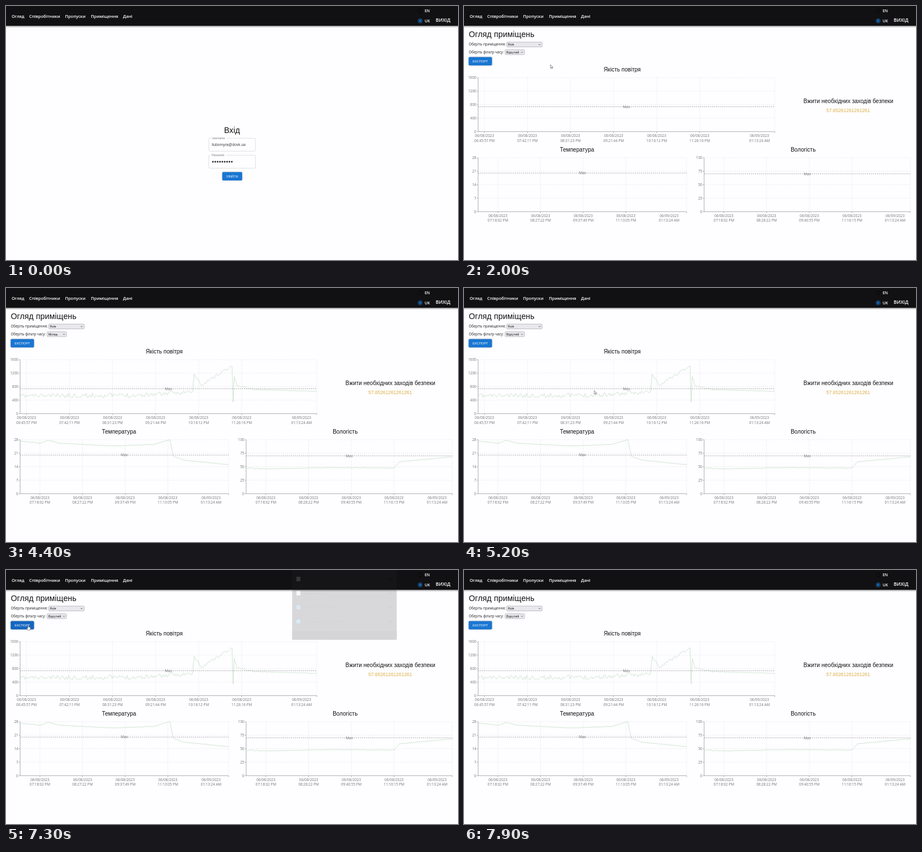
Recreate the animation shown at these times as an HTML page. Size 800 by 450 pixels, loop 8 s.

```html
<!DOCTYPE html>
<html lang="uk">
<head>
<meta charset="utf-8">
<title>Огляд приміщень</title>
<style>
html, body { margin: 0; width: 100%; height: 100%; overflow: hidden; background: #fefdff; }
svg { display: block; width: 100vw; height: 100vh; }
text { font-family: "Liberation Sans", Arial, sans-serif; fill: #111; }
.ui, .ui text, .tick { font-family: "Open Sans", "Noto Sans", sans-serif; }
.nav text { fill: #fff; font-weight: 600; font-size: 7.45px; }
.nav .lang { font-size: 6.8px; }
.nav .exit { font-size: 8.4px; }
.h4 { font-size: 14.17px; letter-spacing: .1px; }
.h5 { font-size: 10px; text-anchor: middle; }
.score { font-size: 8.33px; letter-spacing: .06px; fill: #dbb040; text-anchor: middle; }
.lab { font-size: 6.2px; fill: #222; }
.opt { font-size: 5.25px; }
.btn text { font-size: 5.6px; letter-spacing: .15px; fill: #fff; text-anchor: middle; }
.btn rect { fill: #1976d2; filter: drop-shadow(0 .8px .8px rgba(0,0,0,.35)); }
.tick { font-size: 6.35px; fill: #757575; }
.mid { text-anchor: middle; }
.end { text-anchor: end; }
.grid { stroke: #dcdcdf; stroke-width: .55; stroke-dasharray: 2 1.6; fill: none; }
.axis { stroke: #777; stroke-width: .55; fill: none; }
.max { stroke: #858083; stroke-width: .7; stroke-dasharray: 2 1.6; }
.line { fill: none; stroke: #bcdcc0; stroke-width: .7; stroke-linejoin: round; stroke-dasharray: 1 2; }
.field rect { fill: none; stroke: #c9c9cc; stroke-width: .6; }
.field .gap { fill: #fefdff; stroke: none; }
.small { font-size: 5px; fill: #777; }
.mail { font-size: 6.67px; letter-spacing: .06px; fill: #444; }
.select rect { fill: #e9e9ed; stroke: #8f8f9a; stroke-width: .55; }
.select path { fill: none; stroke: #222; stroke-width: .7; }
.popup text { font-size: 4.4px; fill: #111; }

/* hard switches */
.login { animation: hide 8s step-end infinite; }
.overview { animation: overview 8s step-end infinite; }
.empty { animation: empty 8s step-end infinite; }
.data { animation: data 8s step-end infinite; }
.before { animation: before 8s step-end infinite; }
.after { animation: after 8s step-end infinite; }
.month { animation: month 8s step-end infinite; }
.nofilter { animation: nofilter 8s step-end infinite; }
.arrow { animation: arrow 8s step-end infinite; }
.hand { animation: hand 8s step-end infinite; }
@keyframes hide { 5%, 100% { opacity: 0 } }
@keyframes overview { 0% { opacity: 0 } 5% { opacity: 1 } }
@keyframes empty { 23.75%, 100% { opacity: 0 } }
@keyframes data { 0% { opacity: 0 } 23.75% { opacity: 1 } }
@keyframes before { 20%, 100% { opacity: 0 } }
@keyframes after { 0% { opacity: 0 } 20% { opacity: 1 } }
@keyframes month { 0%, 60%, 100% { opacity: 0 } 35.6% { opacity: 1 } }
@keyframes nofilter { 35.6% { opacity: 0 } 60% { opacity: 1 } }
@keyframes arrow {
  0%, 16.2%, 32.5%, 54.9%, 87.4%, 98.6%, 100% { opacity: 0 }
  5%, 21.25%, 36.25%, 60%, 92.4% { opacity: 1 }
}
@keyframes hand { 0%, 92.4%, 100% { opacity: 0 } 87.4% { opacity: 1 } }

/* motion */
.pointer { animation: move 8s ease-in-out infinite; }
@keyframes move {
  0%, 5% { transform: translate(398px, 301px) }
  15%, 21.25% { transform: translate(105px, 72px) }
  25%, 26.25% { transform: translate(153px, 104px) }
  31.25%, 36.25% { transform: translate(95px, 83px) }
  45% { transform: translate(150px, 112px) }
  53.5%, 60% { transform: translate(95px, 83px) }
  68.75%, 81.25% { transform: translate(312px, 241px) }
  87.5%, 92% { transform: translate(38px, 97px) }
  97.5%, 100% { transform: translate(600px, 40px) }
}
/* the second drawing restarts when the filter changes */
.line { animation: draw 8s linear infinite; }
@keyframes draw {
  0% { stroke-dashoffset: 1.01 }
  25% { stroke-dashoffset: 1.01; animation-timing-function: cubic-bezier(.25,.3,.45,.95) }
  36.24% { stroke-dashoffset: .115 }
  36.25% { stroke-dashoffset: 1.01; animation-timing-function: ease }
  55%, 100% { stroke-dashoffset: 0 }
}
.btn .enter { animation: press 8s step-end infinite; }
@keyframes press { 1.25%, 100% { fill: #1565c0 } }
.btn .export { animation: hover 8s linear infinite; }
@keyframes hover { 0%, 87%, 94%, 100% { fill: #1976d2 } 88.5%, 92% { fill: #1565c0 } }
.popup { animation: popup 8s linear infinite; }
@keyframes popup { 0%, 90.6%, 97.8%, 100% { opacity: 0 } 91.25% { opacity: .17 } 92.5%, 95.5% { opacity: .92 } }
</style>
</head>
<body>
<svg viewBox="0 0 800 450">
  <defs>
    <linearGradient id="shade" x2="0" y2="1">
      <stop stop-color="#000" stop-opacity=".42"/><stop offset="1" stop-color="#000" stop-opacity="0"/>
    </linearGradient>
  </defs>
  <rect width="800" height="450" fill="#fefdff"/>
  <rect y="35" width="800" height="3.5" fill="url(#shade)"/>
  <rect width="800" height="35" fill="#111113"/>
  <g class="ui nav">
    <text x="10" y="21.2">Огляд</text>
    <text x="41" y="21.2">Співробітники</text>
    <text x="104.5" y="21.2">Пропуски</text>
    <text x="150.3" y="21.2">Приміщення</text>
    <text x="207" y="21.2">Дані</text>
    <text class="lang" x="741" y="11.2">EN</text>
    <text class="lang" x="741" y="28.9">UK</text>
    <text class="exit" x="760.5" y="28.4">ВИХІД</text>
  </g>
  <g fill="none" stroke-width=".9">
    <circle cx="733" cy="8.5" r="3.6" stroke="#050506"/>
    <circle cx="733" cy="26.3" r="3.6" stroke="#1976d2"/>
  </g>
  <circle cx="733" cy="26.3" r="2" fill="#1976d2"/>

  <g class="login">
    <text class="h4 mid" x="400" y="225.2">Вхід</text>
    <g class="field">
      <rect x="358.9" y="234.3" width="82.7" height="22.9" rx="1.7"/>
      <rect class="gap" x="362" y="233" width="29" height="3"/>
      <text class="small" x="364.2" y="235.9">Username</text>
      <text class="mail" x="364.2" y="247.8">liubomyra@dovk.ua</text>
    </g>
    <g class="field" id="password">
      <rect x="358.9" y="264.4" width="82.7" height="22.9" rx="1.7"/>
      <rect class="gap" x="362" y="263" width="28" height="3"/>
      <text class="small" x="364.2" y="266">Password</text>
    </g>
    <g class="btn">
      <rect class="enter" x="382.8" y="294.2" width="35.2" height="14.8" rx="1.7"/>
      <text x="400.4" y="303.6">УВІЙТИ</text>
    </g>
  </g>

  <g class="overview">
    <text class="h4" x="8.4" y="55.2">Огляд приміщень</text>
    <text class="lab ui" x="8.4" y="70.2">Оберіть приміщення:</text>
    <text class="lab ui" x="8.4" y="84">Оберіть фільтр часу:</text>
    <g class="select">
      <rect x="75.6" y="63.9" width="62.7" height="8.5" rx="1.4"/>
      <path d="M132.2 67.5l1.6 1.6 1.6-1.6"/>
      <text class="opt before" x="77.8" y="70.1">Оберіть приміщення</text>
      <text class="opt after" x="77.8" y="70.1">Rule</text>
      <rect x="72.7" y="77.6" width="34.3" height="8.5" rx="1.4"/>
      <path d="M101 81.2l1.6 1.6 1.6-1.6"/>
      <text class="opt nofilter" x="75" y="83.8">Відсутній</text>
      <text class="opt month" x="75" y="83.8">Місяць</text>
    </g>
    <g class="btn">
      <rect class="export" x="8.3" y="90.6" width="41.2" height="14.7" rx="1.7"/>
      <text x="28.9" y="100">ЕКСПОРТ</text>
    </g>
    <text class="h5" x="280" y="115.9">Якість повітря</text>
    <text class="h5" x="200" y="257.9">Температура</text>
    <text class="h5" x="600.3" y="257.9">Вологість</text>
    <g class="empty" id="empty">
      <text class="h5" x="680.5" y="178.6">Неможливо прийняти рішення</text>
    </g>
    <g class="data" id="data">
      <text class="h5" x="680.3" y="171.9">Вжити необхідних заходів безпеки</text>
      <text class="score" x="680" y="187.8">57.65261261261261</text>
    </g>
  </g>

  <g class="popup" id="popup">
    <rect x="506.5" y="-3" width="185" height="126.5" rx="2" fill="#2b2c2f"/>
    <rect x="506.5" y="108" width="185" height="15.5" fill="#1c1c1e"/>
  </g>

  <g class="pointer" fill="#fff" stroke="#222" stroke-width=".5">
    <path class="arrow" d="M0 0v6.2l1.5-1.3 1 2.2 1-.45-1-2.1h2z"/>
    <path class="hand" d="M.6.8q.9-.9 1.5 0v3l2.6.6q.9.3.7 1.4l-.6 3.2q-.1.6-.7.6H1.6q-.5 0-.8-.5L-1.4 6q.4-1 2 .2z"/>
  </g>
</svg>
<script>
const $ = id => document.getElementById(id);
const add = (parent, tag, attrs, text) => {
  const el = document.createElementNS("http://www.w3.org/2000/svg", tag);
  for (const key in attrs) el.setAttribute(key, attrs[key]);
  if (text) el.textContent = text;
  parent.append(el);
};
const path = (parent, cls, d) => add(parent, "path", { class: cls, d });
const label = (parent, x, y, text, align) => add(parent, "text", { class: "tick " + align, x, y }, text);

let seed = 11;
const rand = () => (seed = seed * 16807 % 2147483647) / 2147483647;

const HEIGHT = 95.6;

// keys: [x, y, jitter up to the next key]
const air = {
  x0: 25, x1: 550, top: 127, step: 400, max: 178.5, first: 36.2, gap: 76.2, last: 523, grain: 2.2,
  times: ["06:45:57", "07:42:11", "08:31:23", "09:21:44", "10:16:12", "11:26:16"],
  keys: [[25, 191, 8], [230, 190, 8], [330, 184, 0], [333, 154, 6], [347, 173, 5], [364, 160, 6],
    [400, 138, 0], [402, 202, 0], [404, 157, 0], [409, 173, 2], [440, 180, 1], [550, 183, 0]]
};
const temp = {
  x0: 25, x1: 394, top: 268.8, step: 7, max: 296, first: 60, gap: 75.5, last: 363, grain: 4,
  times: ["07:18:02", "08:27:22", "09:37:49", "11:13:05"],
  keys: [[25, 271, 1.2], [60, 275, .5], [75, 270, .5], [95, 275, .5], [190, 280, .5], [262, 277, .5],
    [290, 268.5, 0], [296, 298, .5], [315, 305, .5], [394, 313, 0]]
};
const humid = {
  x0: 425, x1: 790, top: 268.8, step: 25, max: 297.3, first: 460, gap: 75.6, last: 763, grain: 4,
  times: ["07:18:02", "08:28:22", "09:40:55", "11:16:15"],
  keys: [[425, 319.5, 2.5], [465, 320.5, .5], [580, 318, 1], [687, 319, 0], [696, 308, .5], [790, 299, 0]]
};

function frame(parent, c) {
  path(parent, "grid", `M${c.x0} ${c.top}H${c.x1}v${HEIGHT}H${c.x0}z`);
}

function yAxis(parent, c) {
  const bottom = c.top + HEIGHT;
  path(parent, "axis", `M${c.x0} ${c.top}V${bottom}`);
  for (let i = 0; i < 5; i++) {
    const y = bottom - i * HEIGHT / 4;
    if (i % 4) path(parent, "grid", `M${c.x0} ${y}H${c.x1}`);
    path(parent, "axis", `M${c.x0 - 2.5} ${y}h2.5`);
    label(parent, c.x0 - 3.3, y + 2.3, String(i * c.step), "end");
  }
}

function xAxis(parent, c) {
  const bottom = c.top + HEIGHT;
  const stamp = (x, date, time) => {
    label(parent, x, bottom + 9.8, date, "mid");
    label(parent, x, bottom + 18, time, "mid");
  };
  path(parent, "axis", `M${c.x0} ${bottom}H${c.x1}v2.5`);
  c.times.forEach((time, i) => {
    const x = c.first + i * c.gap;
    path(parent, "grid", `M${x} ${c.top}V${bottom}`);
    path(parent, "axis", `M${x} ${bottom}v2.5`);
    stamp(x, "06/08/2023", time + " PM");
  });
  stamp(c.last, "06/09/2023", "01:13:24 AM");
}

function maxLine(parent, c, y) {
  path(parent, "max", `M${c.x0} ${y}H${c.x1}`);
  label(parent, (c.x0 + c.x1) / 2, y + 2.4, "Max", "mid");
}

// straight runs between the keys, split into jittered steps
function curve({ keys, grain }) {
  const points = keys.flatMap(([x, y, jitter], i) => {
    const [nextX, nextY] = keys[i + 1] || [x, y];
    const n = Math.max(1, Math.round((nextX - x) / grain));
    return Array.from({ length: n }, (_, k) => {
      const noise = (rand() - .5) * jitter;
      return `${x + (nextX - x) * k / n} ${y + (nextY - y) * k / n + noise}`;
    });
  });
  return "M" + points.join("L");
}

const empty = $("empty"), data = $("data");
for (const c of [air, temp, humid]) {
  frame(empty, c);
  frame(data, c);
  yAxis(data, c);
  xAxis(data, c);
  add(data, "path", { class: "line", d: curve(c), pathLength: 1 });
  maxLine(data, c, c.max);
}
yAxis(empty, humid);
maxLine(empty, humid, humid.top + HEIGHT);

for (let i = 0; i < 9; i++) add($("password"), "circle", { cx: 366.2 + i * 4.18, cy: 276, r: 1.45, fill: "#222" });

const popup = $("popup");
["zvit_prymishchen_za_misiats_06_2023_temperatura.xlsx", "zvit_povitria_06.xlsx",
  "vologist_za_chas_06_2023.csv", "temperatura_prymishchen_06_2023.csv"].forEach((file, i) => {
  const y = 16 + i * 25;
  if (i < 2) add(popup, "rect", { x: 514, y: y - 4, width: 7, height: 8, fill: "#ddd" });
  else add(popup, "circle", { cx: 517.5, cy: y, r: 4, fill: "#2f8fc4" });
  add(popup, "text", { x: 528, y: y + 1.5 }, file);
  add(popup, "circle", { cx: 680, cy: y, r: 2.6, fill: "#161618" });
});
add(popup, "text", { x: 513, y: 115 }, "Показати більше файлів");
</script>
</body>
</html>
```
